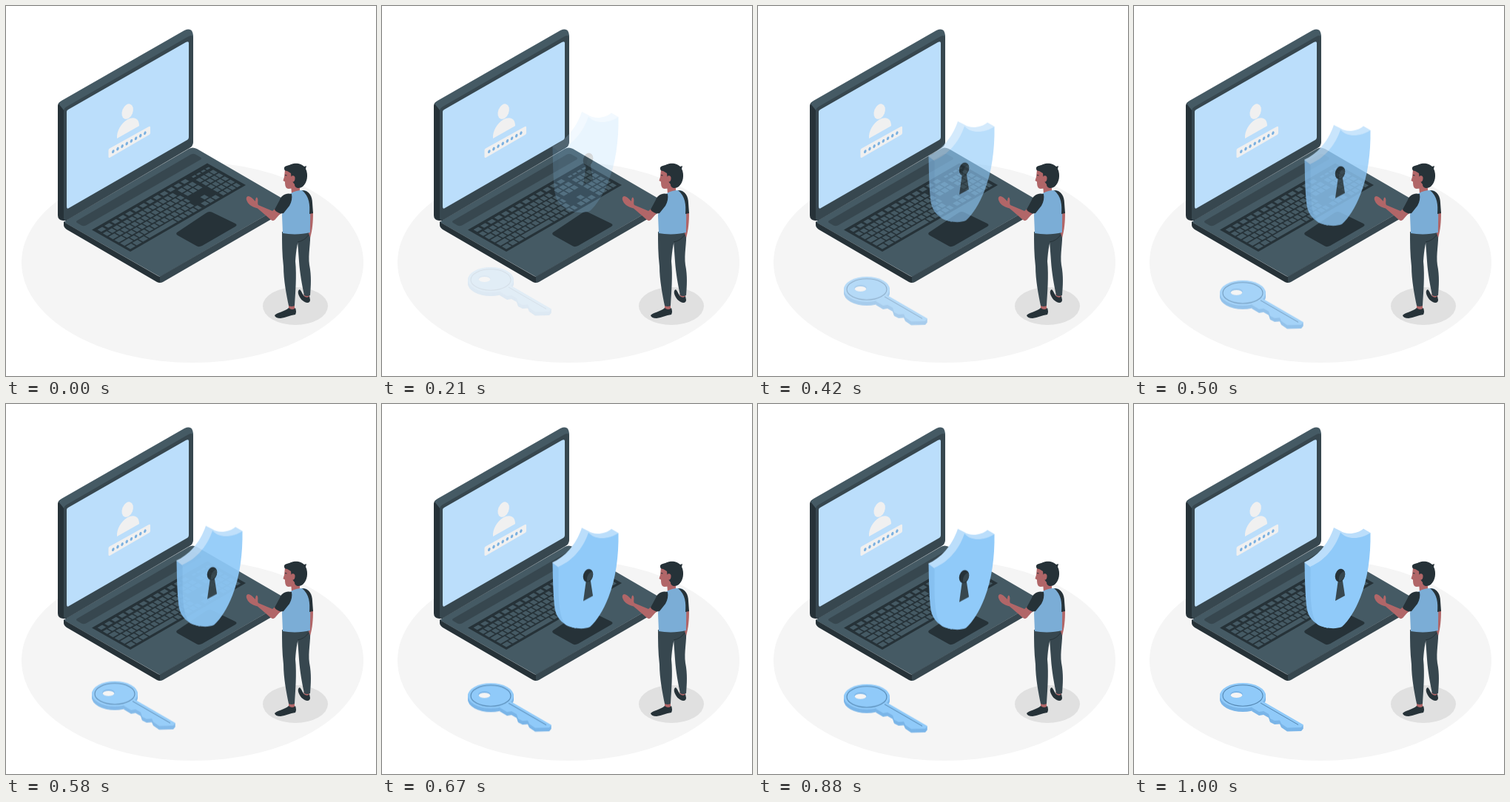
These frames come from a looping animation (500 px wide and 500 px high, 1.04 s). An HTML page with a canvas:

```html
<!DOCTYPE html>
<html lang="en">
<head>
<meta charset="utf-8">
<title>Secure login</title>
<style>
html, body { margin: 0; width: 100%; height: 100%; overflow: hidden; background: #fff; }
canvas { display: block; width: 500px; height: 500px; }
</style>
</head>
<body>
<canvas id="stage" width="500" height="500"></canvas>
<script>
const LOOP = 1040, STEP = 1000 / 24, LEAD = 25, DROP = 30;
const C = {
  ink: '#263238', dark: '#37474f', slate: '#455a64', screen: '#bbdefb', pale: '#f0f0f0',
  floor: '#f5f5f5', shade: '#e0e0e0', blue: '#90caf9', side: '#7ab5e8', rim: '#86c0f0',
  line: '#5588b3', dot: '#7ab0e0', shirt: '#7badd6', skin: '#b16668'
};

function layer() {
  const c = document.createElement('canvas');
  c.width = c.height = 500;
  return c.getContext('2d');
}

function fill(g, color, d) {
  g.fillStyle = color;
  g.fill(new Path2D(d));
}

function stroke(g, color, width, d) {
  g.strokeStyle = color;
  g.lineWidth = width;
  g.stroke(new Path2D(d));
}

function oval(g, color, x, y, rx, ry, turn = 0) {
  g.fillStyle = color;
  g.beginPath();
  g.ellipse(x, y, rx, ry, turn, 0, Math.PI * 2);
  g.fill();
}

function drawScreen(g) {
  fill(g, C.ink, 'M70 135Q70 131 74 129L82 136V290H77Q70 289 70 283Z');
  fill(g, C.slate, 'M71 132Q72 130 75 128L241 33Q252 28 253 40V46L79 142Z');
  fill(g, C.dark, 'M78 143Q78 138 82 136L245 42Q253 37 253 44V184Q253 189 248 192L83 289Q78 291 78 287Z');
  fill(g, C.screen, 'M82 143Q82 141 84 140L243 49Q247 47 247 50V177Q247 180 244 181.500L85 273Q82 275 82 271Z');
  oval(g, C.pale, 164.2, 142.6, 7.2, 10.6, 0.38);
  fill(g, C.pale, 'M150 179C149 169 156 158 164 153.5C172 149 180 151 180 162Z');
  fill(g, C.pale, 'M138.5 195Q138.5 193.500 140 192.500L193 163Q195 162 195 164V171.500Q195 173 193.500 174L141 204.500Q138.500 206 138.500 203.500Z');
  for (let i = 0; i < 8; i++) oval(g, C.dot, 144.8 + i * 6.15, 196.6 - i * 3.55, 1.6, 2.5, 0.4);
}

function drawKeys(g) {
  g.save();
  g.transform(156, -90, 52, 29.5, 116, 302.5);
  const rect = (u, v, w, h, color = C.slate) => {
    g.fillStyle = color;
    g.fillRect(u, v, w, h);
  };
  rect(0, 0, 1, 1, C.ink);
  for (let i = 0; i < 13; i++) rect(0.025 + i * 0.06, 0.07, 0.042, 0.1);
  for (let i = 0; i < 4; i++) rect(0.83 + i * 0.04, 0.1, 0.028, 0.05);
  for (let row = 0; row < 5; row++) {
    const v = 0.225 + row * 0.15, h = 0.115;
    const lead = [0.034, 0.05, 0.06, 0.075, 0.045][row];
    rect(0.02, v, lead, h);
    let u = 0.03 + lead;
    if (row === 4) {
      rect(u, v, 0.045, h);
      rect(u + 0.055, v, 0.045, h);
      rect(u + 0.11, v, 0.24, h);
      u += 0.36;
    }
    for (; u < 0.595; u += 0.044) rect(u, v, 0.034, h);
    if (u < 0.63) rect(u, v, 0.64 - u, h);
    for (let i = 0; i < 3; i++) {
      if (row !== 2 && (row !== 3 || i === 1)) rect(0.668 + i * 0.046, v, 0.036, h);
    }
    for (let i = 0; i < 4; i++) rect(0.825 + i * 0.04, v, 0.031, h);
  }
  g.restore();
}

function drawBase(g) {
  fill(g, C.slate, 'M78 292L84 288L247 193Q252 190 258 193L382 265L208 366Z');
  fill(g, C.ink, 'M78 291Q79 292 81 293.500L204 364Q208 366 208 366V374Q206 374 204 373L82 302Q78 299 78 296Z');
  fill(g, C.dark, 'M208 365.500L382 265V274.500L212 373Q210 374 208 374Z');
  fill(g, C.dark, 'M96 290L250 200.500Q253 199 256 200.500L263 204.500Q265 206 263 207.500L108 296.500Q105 298 102 296.500L96 293Q94 291.500 96 290Z');
  drawKeys(g);
  fill(g, C.ink, 'M231 306L270 280Q274 277 278 278.500L310 294Q313 296 310 298L265 324Q261 326 258 324.500L232 310Q229 308 231 306Z');
}

function drawMan(g) {
  // legs and shoes
  fill(g, C.skin, 'M402 389H410V396H404Z');
  fill(g, C.ink, 'M397 383Q394 384 395 389C397 395 401 400 407 401Q411 401 411 397L410 392Q408 395 404 393C401 391 400 386 397 383Z');
  fill(g, C.dark, 'M392 306H411C412 320 408 335 410 350C413 365 412 378 411 391Q407 393 403 391C400 377 397 360 396 345L394 318Z');
  fill(g, C.skin, 'M382 403H390V411H382Z');
  fill(g, C.ink, 'M382 408C377 413 366 414 363 418Q364 422 371 422C378 421 384 418 391 417Q393 413 391 408Q387 412 382 408Z');
  fill(g, C.dark, 'M373 305L399 307C394 316 392 330 391 345C393 365 391 388 390 405Q386 407 382 405C379 390 375 370 375 352C373 335 373 320 373 305Z');
  stroke(g, C.ink, 1, 'M394 319Q404 317 409 309');
  // right arm, neck, shirt
  fill(g, C.skin, 'M409 279L415 278C415 292 414 303 411 313L409 307Z');
  fill(g, C.skin, 'M385 241H397V254H386Z');
  fill(g, C.shirt, 'M385 253C392 249 401 248 406 250C413 258 411 285 411 306C400 309 384 309 374 307L373 283C374 272 378 260 385 253Z');
  fill(g, C.ink, 'M400 249C410 249 414 258 414 266L415 280L410 281C411 269 410 257 400 249Z');
  // raised arm
  fill(g, C.skin, 'M365 273L360 277L341 269C339 266 342 262 339 258.500Q337 259 337 264C334 261 331 257 327 257Q324 258 325 262C327 268 331 271 340 273.500L358 289Q362 292 365 287L373 278Z');
  fill(g, C.ink, 'M386 254C378 252 372 256 370 262L363 275C365 279 371 281 375 280L383 270C386 265 387 259 386 254Z');
  // head
  fill(g, C.skin, 'M377 221L376 231L374.500 236L377 237.500C377 243 378 247 382 247L391 246L396 225Z');
  fill(g, C.ink, 'M376 220C375 216 381 216 385 214C393 211 400 214 403 217L406 216L405 220C409 228 407 239 401 244C397 247 390 247 390 241L386 236L385 226L380 223Q376 223 376 220Z');
  oval(g, C.skin, 387.5, 233.5, 3, 4.2, 0.15);
  stroke(g, C.ink, 1, 'M377 228.500L379.500 229');
}

function drawShield(g) {
  fill(g, C.rim, 'M230.500 214L240 219L262 303C246 299 236 291 233.500 276C231 256 231 234 230.500 214Z');
  fill(g, C.screen, 'M230 214C246 207 262 191 270 167L279 171.500C286 177 302 176 310 168.500L319.500 174C306 184 288 185 279 175C271 198 255 214 238.500 220.500Z');
  fill(g, C.blue, 'M238.500 219.500C255 213 271 197 279 173.500C288 184 306 183 319.500 174C320 205 316 236 306 261C299 279 290 293 281 301C272 305 257 303 248 298C236 284 239 244 238.500 219.500Z');
  // keyhole: dark opening with a lighter inner wall
  fill(g, C.dark, 'M276 237L281.500 236L285 259L272 266Z');
  oval(g, C.ink, 278.500, 231.500, 6.500, 9, 0.3);
  fill(g, C.dark, 'M284.500 226C280 227 276 232 277 239.500C282 239 287 232 284.500 226Z');
}

function drawKey(g) {
  const bow = dy => `M116 ${394 + dy}a31 17 0 0 1 62 0a31 17 0 0 1 -62 0Z`;
  const bit = dy => `M171 ${401 + dy}L178 ${404 + dy}L229 ${433.5 + dy}L226 ${437 + dy}L207 ${437.5 + dy}L199 ${432 + dy}L197 ${427.5 + dy}L190 ${428 + dy}L184 ${425 + dy}L182 ${419 + dy}L175 ${415 + dy}L169 ${416 + dy}L159 ${410 + dy}Z`;
  for (let dy = 5; dy > 0; dy--) {
    fill(g, C.side, bow(dy));
    fill(g, C.side, bit(dy));
  }
  fill(g, C.blue, bow(0));
  fill(g, C.blue, bit(0));
  stroke(g, C.line, 1.1, 'M120 394a27 14.200 0 0 1 54 0a27 14.200 0 0 1 -54 0Z');
  stroke(g, C.line, 1, 'M171 404L222 433.500');
  oval(g, C.side, 138.500, 392.500, 8.300, 4.500);
  oval(g, C.floor, 138.500, 393.500, 7.800, 3.500);
}

// cubic-bezier(.36, -.01, .5, 1.38), solved by bisection
function ease(x) {
  if (x >= 1) return 1;
  const curve = (u, a, b) => 3 * a * u * (1 - u) ** 2 + 3 * b * u * u * (1 - u) + u ** 3;
  let lo = 0, hi = 1;
  for (let i = 0; i < 30; i++) {
    const mid = (lo + hi) / 2;
    if (curve(mid, 0.36, 0.5) < x) lo = mid; else hi = mid;
  }
  return curve(lo, -0.01, 1.38);
}

const scene = layer(), props = layer();
scene.fillStyle = '#fff';
scene.fillRect(0, 0, 500, 500);
oval(scene, C.floor, 252, 346.5, 231, 135.5);
oval(scene, C.shade, 391, 405.5, 44, 25.5);
drawBase(scene);
drawScreen(scene);
drawMan(scene);
drawShield(props);
drawKey(props);

const stage = document.getElementById('stage').getContext('2d');
const start = performance.now();

function render(ms) {
  const tick = Math.floor((ms % LOOP + 5) / STEP);
  stage.globalAlpha = 1;
  stage.drawImage(scene.canvas, 0, 0);
  if (tick < 3) return;
  const e = ease((tick * STEP + LEAD) / 1000);
  stage.globalAlpha = Math.min(1, Math.max(0, e));
  stage.drawImage(props.canvas, 0, DROP * (e - 1));
}

function loop() {
  render(performance.now() - start);
  requestAnimationFrame(loop);
}
loop();
</script>
</body>
</html>
```
